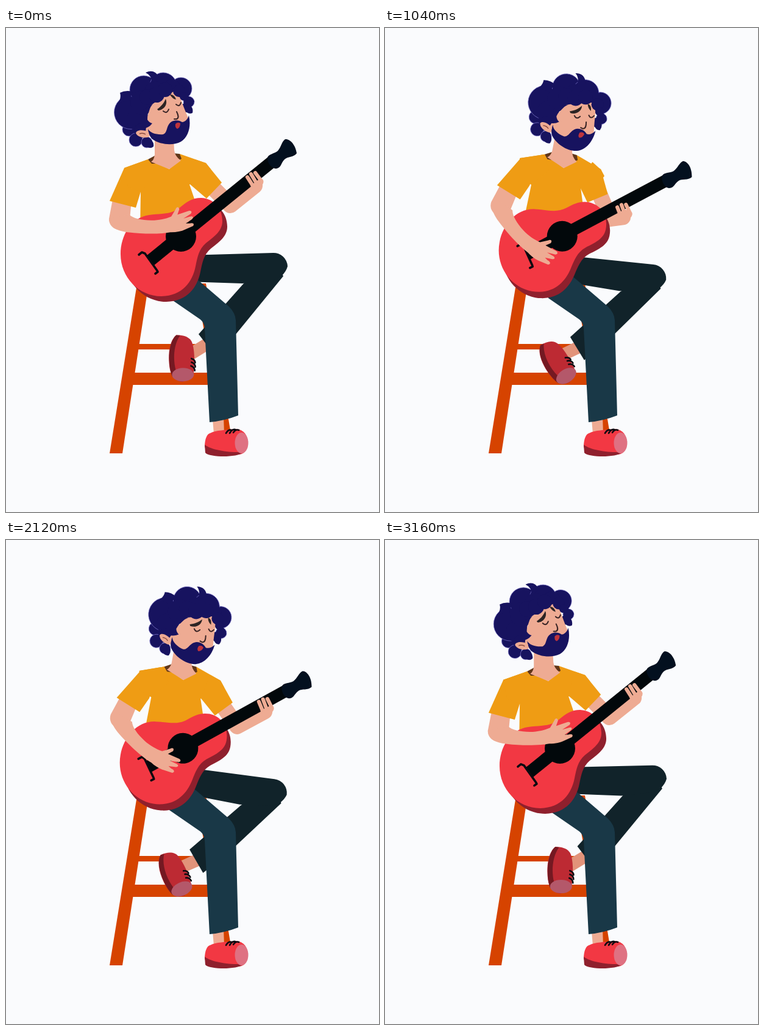
Recreate the animation shown at these times as an HTML page. Size 612 px wide and 792 px high, loop 3.2 s.

```html
<!DOCTYPE html>
<html lang="en">
<head>
<meta charset="utf-8">
<title>Guitar player</title>
<style>
  html, body { margin: 0; width: 100%; height: 100%; overflow: hidden; background: #fafbfd; }
  svg { display: block; width: 100vw; height: 100vh; }
  .skin { fill: #eeab93; }
  .limb { fill: none; stroke: #eeab93; stroke-linecap: round; stroke-linejoin: round; }
  .shirt { fill: #ef9c14; }
  .hair { fill: #17135f; }
  .curl { fill: #17135f; stroke: #7d76c9; stroke-width: .7; }
  .wood { fill: #d64300; }
  .jeans { fill: #193847; }
  .far { fill: #11232a; }
  .red { fill: #f23843; }
  .maroon { fill: #8f202d; }
  .ink { fill: none; stroke: #0a0a10; stroke-linecap: round; stroke-linejoin: round; }
</style>
</head>
<body>
<svg viewBox="0 0 612 792">
  <defs>
    <path id="box" d="M188 370C188 340 205 310 235 306C255 303 270 306 285 294C297 284 306 278 320 278C342 279 355 296 355 316C355 332 342 341 328 352C316 362 314 376 311 390C306 415 290 438 255 439C218 439 188 408 188 370Z"/>
  </defs>

  <g class="wood">
    <path d="M214 425L170 696H191L233 425Z"/>
    <path d="M312 418H328L368 658H352Z"/>
    <path d="M215 517H330V526H215Z"/>
    <path d="M207 564H332V584H207Z"/>
  </g>

  <g id="thigh">
    <g id="shin">
      <path class="limb" d="M330 517L304 533" stroke-width="20" style="stroke:#e2937a"/>
      <path class="far" d="M390 418L316 501L343 536L378 500L455 406L440 380Z"/>
      <g id="foot">
        <path d="M280 502C293 502 303 506 306 516C310 530 309 550 307 566L289 579C276 577 270 569 268 556C265 535 268 511 280 502Z" fill="#bd2a33"/>
        <path d="M280 502L286 503C276 516 273 540 278 560L272 570C265 553 265 514 280 502Z" fill="#741922"/>
        <ellipse cx="289.500" cy="567" rx="18" ry="11" fill="#b4586a"/>
        <path class="ink" stroke-width="2.600" d="M304 541Q310 543 310 548M304 547Q310 549 310 555M303 553Q309 555 309 561"/>
      </g>
    </g>
    <path class="far" d="M296 372L438 368A23 23 0 0 1 462 390Q460 398 452 406L440 412L388 418L296 415Z"/>
  </g>

  <path class="skin" d="M339 640L341 664H358L357 636Z"/>
  <path class="jeans" d="M268 442L319 477Q325 482 326 491L334 645Q358 643 381 634L377 478Q376 466 366 456L318 415L300 400L262 415Z"/>
  <path class="red" d="M326 686C326 672 330 664 335 663C345 658 360 658 375 656C388 656 397 664 397 680C396 692 390 698 380 698L340 697Z"/>
  <path class="maroon" d="M326 682C338 691 366 695 390 694C384 699 370 701 357 701C345 701 330 699 327 695Z"/>
  <ellipse cx="386.500" cy="679" rx="11" ry="17" fill="#df7182"/>
  <path class="ink" stroke-width="2.600" d="M361 663Q365 656 370 658M367 663Q371 656 376 657M373 662Q377 656 382 658"/>

  <g id="body">
    <path id="farArm" class="limb" stroke-width="26"/>
    <path class="shirt" d="M233 215L194 229L221 268L220 335H312L316 300L301 256L326 250L336 231L328 221L285 206L268 231Z"/>
    <path id="sleeve" class="shirt" d="M310 215L328 221L354 253L329 279L301 255Z"/>
    <path d="M233 215L244 209L247 222L239 222ZM275 205L285 206L288 214L280 218Z" fill="#603619"/>
    <path class="skin" d="M244 180L244 207Q243 216 238 219L268 231L287 217Q277 210 276 200L275 180Z"/>

    <g id="head">
      <g id="curls"></g>
      <path class="hair" d="M187 106Q196 101 208 104L202 120Q190 119 182 126Q190 115 187 106ZM229 73Q243 66 251 80L240 92Q240 78 229 73ZM296 111Q305 112 309 120Q305 127 301 125Q308 131 306 139Q298 143 292 132ZM230 178Q244 184 242 194Q235 200 226 190Z"/>
      <path class="skin" d="M229 172L231 148L238 126L262 110L275 104L286 114Q293 134 299 147L296 165L270 180L240 180Z"/>
      <path class="hair" d="M224 135L241 124Q231 136 232 150Q235 155 240 156Q234 164 224 165Z"/>
      <g id="fringe" class="hair"></g>
      <path class="hair" d="M233 165C236 172 248 175 258 174C266 171 262 159 272 153C278 150 285 151 289 154C293 154 298 150 300 143C304 160 300 178 287 186C272 194 250 190 239 181C235 176 233 170 233 165Z"/>
      <path class="skin" d="M213 172C214 166 226 166 234 170L235 178C228 181 216 179 213 172Z"/>
      <path d="M219 173Q225 171 229 174" fill="none" stroke="#8a4b3f" stroke-width="1.400"/>
      <path d="M248 133C255 128 259 123 262 116C266 125 259 134 250 135ZM269 109Q276 108 279 117Q273 116 269 109Z" fill="#2c2424"/>
      <path class="ink" stroke-width="2" style="stroke:#3a2526" d="M258 136Q264 141 267 133M279 125Q285 130 287 122M280 137C283 143 284 147 280 149L276 149"/>
      <path d="M278 157Q282 153 286 156Q286 163 281 165Q277 163 278 157Z" fill="#bf343c"/>
    </g>

    <use href="#box" class="maroon" x="8" y="9"/>
    <use href="#box" class="red"/>
    <path d="M236 381L436 219" stroke="#02080b" stroke-width="20"/>
    <circle cx="287" cy="341" r="25" fill="#02080b"/>
    <path class="ink" stroke-width="3.600" d="M218 371L223 367L228 369L248 397L249 399L245 402"/>
    <path d="M429 212C431 206 440 206 446 201C452 194 452 186 458 182C466 181 475 191 477 205C472 212 462 210 457 215C451 221 452 228 444 230C436 231 428 220 429 212Z" fill="#03101f"/>

    <g id="fingers">
      <path class="skin" d="M401 258L417 246Q424 247 422 254Q417 266 408 268Z"/>
      <path class="limb" stroke-width="6.200" d="M405 258L396 244M411 254L402 239M418 249L409 237"/>
    </g>

    <g id="upper">
      <path class="skin" d="M177 270L169 312A17 17 0 0 0 203 314L207 270Z"/>
      <g id="fore">
        <path class="skin" d="M169 312C169 325 180 332 200 334C228 337 255 336 270 333C280 333 288 331 294 328L307 322C310 318 306 316 301 318L295 318L305 311C309 307 305 305 301 307L291 310L303 302C306 298 302 296 298 298L281 304L284 295C283 290 279 291 278 295L271 307C262 311 250 314 238 314C222 314 208 311 202 305Z"/>
      </g>
      <path class="shirt" d="M194 229L170 283L213 294L221 268L224 235Z"/>
    </g>
    <path class="shirt" d="M233 215L194 229L200 260L221 268L245 240Z"/>
  </g>
</svg>
<script>
  const LOOP = 3200, STEP = 40;
  const el = id => document.getElementById(id);

  const dots = (list, cls) => list.map(([x, y, r]) =>
    `<circle class="${cls}" cx="${x}" cy="${y}" r="${r}"/>`).join("");
  el("curls").innerHTML = dots([
    [202, 166, 11], [213, 183, 11], [231, 187, 9], [300, 121, 9], [205, 138, 27.5],
    [287, 99, 18], [226, 101, 23], [258, 95, 22]], "curl") +
    dots([[216, 150, 18], [222, 168, 12], [224, 122, 20], [245, 105, 18], [272, 98, 14], [296, 130, 8]], "hair");
  el("fringe").innerHTML = dots([
    [232, 113, 13], [247, 109, 13], [261, 101, 12], [284, 103, 10], [292, 112, 7]], "hair");

  // Swing from 0 to 1 and back over one period
  const swing = (t, period) => (1 - Math.cos(2 * Math.PI * t / period)) / 2;
  const turn = (id, deg, x, y) => el(id).setAttribute("transform", `rotate(${deg} ${x} ${y})`);

  function pose(t) {
    const sway = swing(t, 1600), beat = swing(t, 800), lead = swing(t + 40, 800);
    turn("body", 14 * sway, 290, 360);
    turn("head", 23 * beat, 235, 180);
    turn("upper", 9.4 * beat, 200, 245);
    turn("fore", 38 * lead, 186, 318);
    turn("thigh", 11.4 * beat, 293, 395);
    turn("shin", -1.8 * beat, 432, 396);
    turn("foot", -48 * lead, 300, 527);

    // The fretting hand slides down the neck during the first half only
    const slide = t < 1600 ? Math.sin(Math.PI * t / 1600) : 0;
    const dx = -33 * slide, dy = 37 * slide;
    const a = 11 * slide * Math.PI / 180, c = Math.cos(a), s = Math.sin(a);
    const ex = 318 + 50 * c - 50 * s, ey = 240 + 50 * s + 50 * c;
    turn("sleeve", 14 * slide, 324, 224);
    el("farArm").setAttribute("d", `M322 244L${ex} ${ey}L${408 + dx} ${258 + dy}`);
    el("fingers").setAttribute("transform", `translate(${dx} ${dy})`);
  }

  const start = performance.now();
  function frame() {
    const t = (performance.now() - start) % LOOP;
    pose(Math.floor(t / STEP) * STEP);
    requestAnimationFrame(frame);
  }
  pose(0);
  requestAnimationFrame(frame);
</script>
</body>
</html>
```
